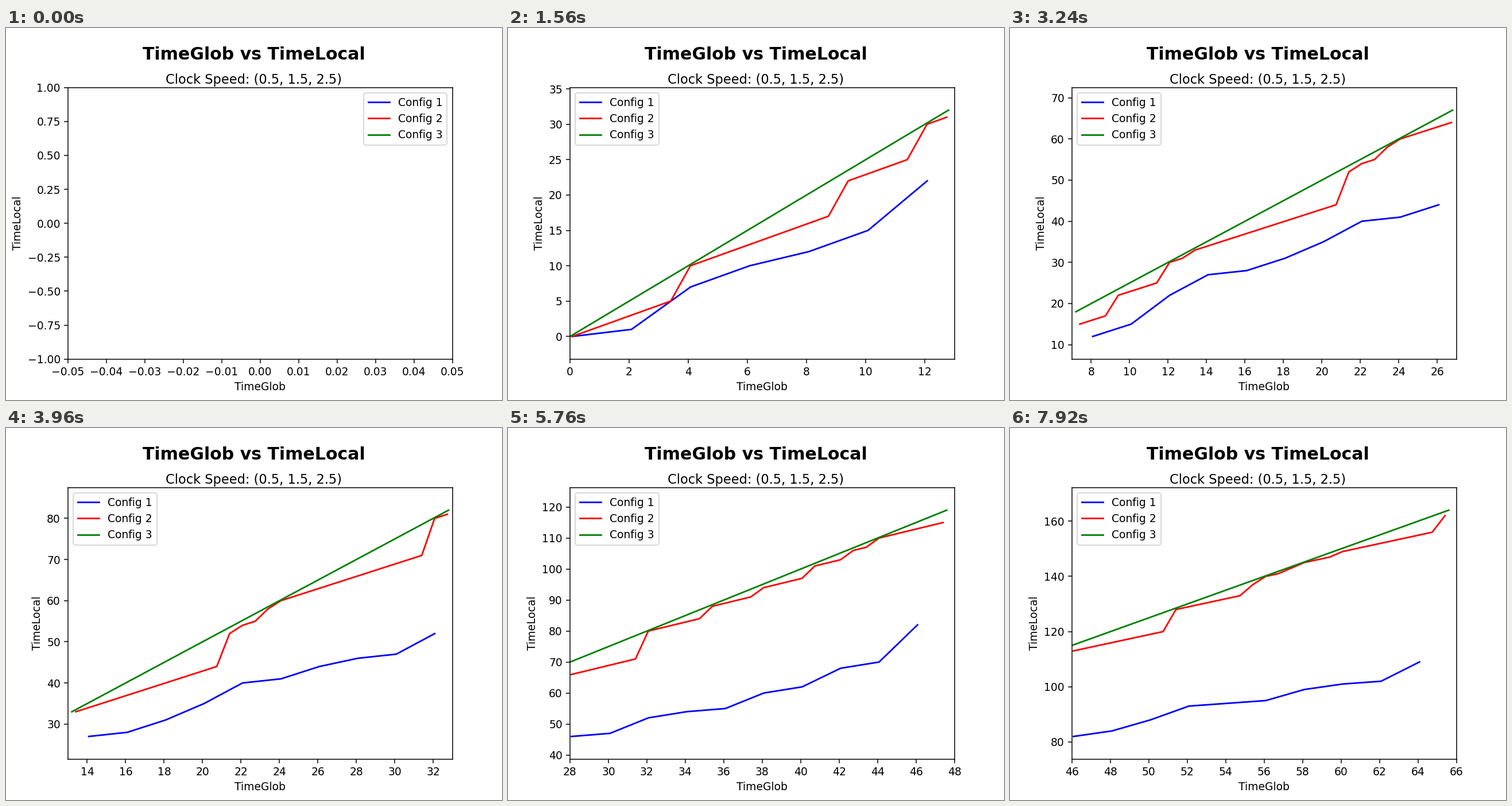
These frames come from a looping animation (864x648 px, 8 s). A matplotlib script:

```python
import numpy as np
import matplotlib.pyplot as plt
from matplotlib.animation import FuncAnimation
from matplotlib.ticker import MaxNLocator

WINDOW = 20        # seconds of history on screen
TICK_MS = 40
HOLD = 3           # ticks per simulated second
FRAMES = 200


def clock(count, jumps):
    """Logical clock: one per step, more where a message moves it ahead."""
    steps = np.ones(count, int)
    steps[0] = 0
    for k, jump in jumps.items():
        steps[k] = jump
    return np.cumsum(steps)


slow_steps = [0, 1, 6, 3, 2, 3, 7, 5, 1, 3, 4, 5, 1, 3, 2, 1, 5,
              2, 1, 5, 2, 6, 2, 12, 2, 4, 5, 1, 1, 4, 2, 1, 7]
mid_jumps = {6: 5, 14: 5, 18: 5, 20: 2, 32: 8, 33: 2, 35: 3, 36: 2, 48: 9,
             53: 4, 57: 3, 61: 4, 64: 3, 66: 3, 77: 8, 83: 4, 84: 3,
             86: 2, 87: 2, 90: 2, 98: 6}

series = [
    (0.08 + 2 * np.arange(33), np.cumsum(slow_steps)),
    (0.073 + np.arange(99) / 1.5, clock(99, mid_jumps)),
    (0.40002 * np.arange(166), clock(166, {})),   # tiny drift per tick
]

fig, ax = plt.subplots(figsize=(6.4, 4.8), dpi=135)
fig.subplots_adjust(left=0.125, right=0.9, bottom=0.11, top=0.84)
fig.suptitle("TimeGlob vs TimeLocal", y=0.95, fontsize=16, fontweight="bold")
fig.text(0.5, 0.85, "Clock Speed: (0.5, 1.5, 2.5)", ha="center", fontsize=12)
ax.set_xlabel("TimeGlob")
ax.set_ylabel("TimeLocal")
ax.xaxis.set_major_locator(MaxNLocator(integer=True))

lines = [ax.plot([], [], color=color, label=f"Config {n}")[0]
         for n, color in enumerate(("blue", "red", "green"), 1)]
ax.legend(loc="best")


def update(tick):
    now = tick // HOLD
    shown = []
    for line, (x, y) in zip(lines, series):
        seen = (x > now - WINDOW) & (x < now)
        if now < WINDOW:
            seen = x < now
        line.set_data(x[seen], y[seen])
        shown.extend(y[seen])

    if now == 0:
        ax.set_xlim(-0.05, 0.05)
    else:
        ax.set_xlim(max(0, now - WINDOW), now)

    low, high = (min(shown), max(shown)) if shown else (0, 0)
    pad = 0.1 * (high - low) or 1
    ax.set_ylim(low - pad, high + pad)
    return lines


anim = FuncAnimation(fig, update, frames=FRAMES, interval=TICK_MS,
                     init_func=lambda: update(0), repeat=True, repeat_delay=0)
plt.show()
```
